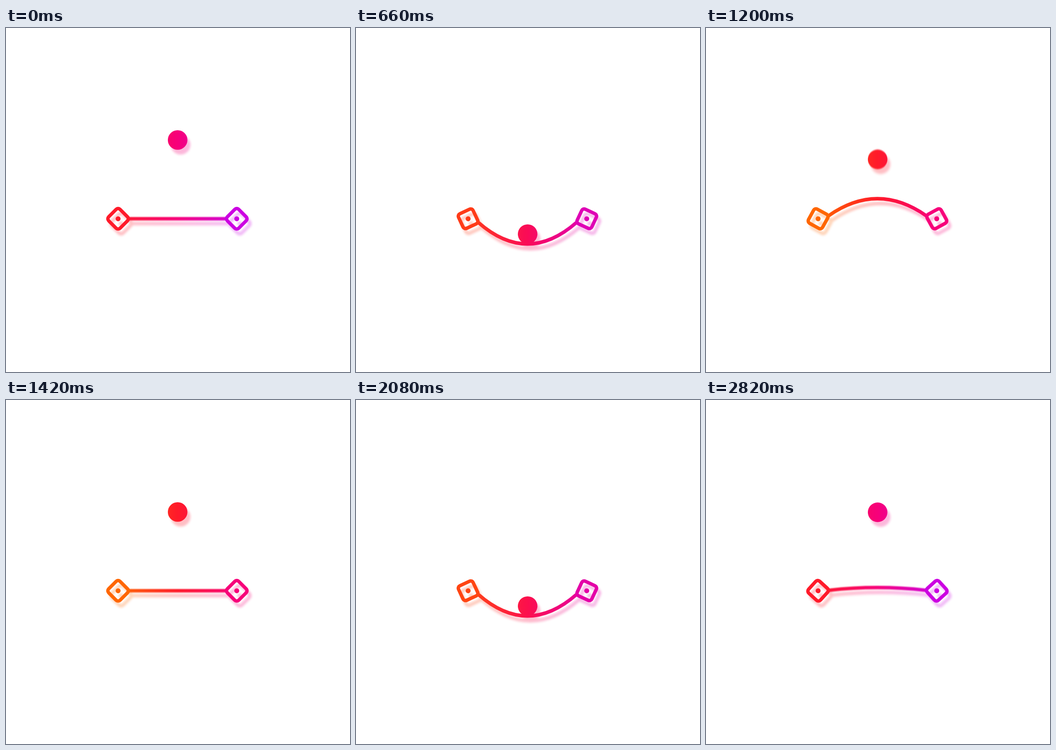
Recreate the animation shown at these times as an HTML page. Size 748x748 px, loop 2840 ms.

```html
<!DOCTYPE html>
<html lang="en">
<head>
<meta charset="utf-8">
<title>Bouncing ball on a string</title>
<style>
  html, body { margin: 0; width: 100%; height: 100%; overflow: hidden; background: #fff; }
  svg { display: block; width: 100vw; height: 100vh; }
</style>
</head>
<body>
<svg viewBox="0 0 748 748">
  <defs>
    <linearGradient id="paint" gradientUnits="userSpaceOnUse" x1="243" y1="0" x2="502" y2="0">
      <stop offset="0"/><stop offset=".5"/><stop offset="1"/>
    </linearGradient>
    <filter id="soft" filterUnits="userSpaceOnUse" x="0" y="0" width="748" height="748" color-interpolation-filters="sRGB">
      <feGaussianBlur stdDeviation="2.6"/>
    </filter>
    <filter id="ballBlur" filterUnits="userSpaceOnUse" x="0" y="0" width="748" height="748" color-interpolation-filters="sRGB">
      <feGaussianBlur stdDeviation="0 0.01"/>
    </filter>
    <filter id="lineBlur" filterUnits="userSpaceOnUse" x="0" y="0" width="748" height="748" color-interpolation-filters="sRGB">
      <feGaussianBlur stdDeviation="0 0.01"/>
    </filter>
    <g id="knot">
      <rect x="-17.5" y="-17.5" width="35" height="35" rx="6" transform="rotate(45)" fill="none" stroke="currentColor" stroke-width="7.5"/>
      <circle r="5.4" fill="currentColor"/>
    </g>
  </defs>
  <g filter="url(#soft)" opacity=".28"><use href="#scene" x="6.5" y="10.5"/></g>
  <g id="scene">
    <g filter="url(#lineBlur)"><path id="line" fill="none" stroke="url(#paint)" stroke-width="7.6"/></g>
    <use id="left" href="#knot"/>
    <use id="right" href="#knot"/>
    <g filter="url(#ballBlur)"><circle id="ball" cx="373.2" r="21.3" fill="url(#paint)"/></g>
  </g>
</svg>
<script>
const BOUNCE = 1420, LOOP = 2 * BOUNCE, STEP = 20;
const LEFT = 243.75, RIGHT = 501.75, REST = 414.8, ARM = 24;
const CONTACT = 393.5; // ball height when it touches the level string

// [time, value] keys over one bounce
const ballKeys = [[0, 243.5], [200, 255.5], [380, 325], [490, 394], [540, 421], [770, 459],
  [1000, 419], [1080, 354], [1280, 258], [1400, 244.1]];
const swingKeys = [[0, 0], [100, 26], [240, 0], [345, -18], [380, -16], [480, 0], [770, -1],
  [1000, -10], [1080, -38], [1150, -46], [1280, -34], [1400, -7]];

const palette = [[255, 102, 0], [255, 26, 42], [247, 0, 122], [204, 0, 226]];

// Smooth periodic curve that never overshoots its keys
function curve(keys) {
  const n = keys.length;
  const key = i => {
    const turn = Math.floor(i / n), k = keys[i - turn * n];
    return [k[0] + turn * BOUNCE, k[1]];
  };
  const slope = i => {
    const a = key(i), b = key(i + 1);
    return (b[1] - a[1]) / (b[0] - a[0]);
  };
  const tangent = i => {
    const p = slope(i - 1), q = slope(i);
    return p * q <= 0 ? 0 : 2 * p * q / (p + q);
  };
  return time => {
    const t = ((time % BOUNCE) + BOUNCE) % BOUNCE;
    let i = n - 1;
    while (keys[i][0] > t) i--;
    const a = key(i), b = key(i + 1), h = b[0] - a[0], u = (t - a[0]) / h, v = 1 - u;
    return v * v * (1 + 2 * u) * a[1] + u * u * (3 - 2 * u) * b[1]
      + h * u * v * (v * tangent(i) - u * tangent(i + 1));
  };
}

const ballY = curve(ballKeys);
const swing = curve(swingKeys);
const sag = t => Math.max(swing(t), ballY(t) - CONTACT);

const ease = u => { u = Math.min(1, Math.max(0, u)); return u * u * (3 - 2 * u); };
const mix = (a, b, u) => `rgb(${a.map((v, i) => Math.round(v + (b[i] - v) * u))})`;
const smear = (f, t) => `0 ${Math.max(0.01, Math.abs(f(t + 5) - f(t - 5)) / 3.46).toFixed(2)}`;

const $ = id => document.getElementById(id);
const stops = document.querySelectorAll("#paint stop");
const ball = $("ball"), line = $("line"), left = $("left"), right = $("right");
const blurOf = id => document.querySelector(`#${id} feGaussianBlur`);
const ballBlur = blurOf("ballBlur"), lineBlur = blurOf("lineBlur");

function draw(time) {
  const t = time % BOUNCE;
  const y = ballY(t), off = sag(t);

  const shift = ease((t - 500) / 350);
  const warm = time < BOUNCE ? shift : 1 - shift;
  const colors = [0, 1, 2].map(i => mix(palette[i + 1], palette[i], warm));
  stops.forEach((s, i) => s.setAttribute("stop-color", colors[i]));
  left.style.color = colors[0];
  right.style.color = colors[2];

  const angle = Math.atan2(off, 150), deg = angle * 180 / Math.PI;
  left.setAttribute("transform", `translate(${LEFT} ${REST}) rotate(${deg})`);
  right.setAttribute("transform", `translate(${RIGHT} ${REST}) rotate(${-deg})`);

  const dx = ARM * Math.cos(angle), endY = REST + ARM * Math.sin(angle);
  const pullY = 2 * (REST + off) - endY;
  line.setAttribute("d", `M${LEFT + dx} ${endY}Q${(LEFT + RIGHT) / 2} ${pullY} ${RIGHT - dx} ${endY}`);
  lineBlur.setAttribute("stdDeviation", smear(sag, t));

  ball.setAttribute("cy", y);
  ballBlur.setAttribute("stdDeviation", smear(ballY, t));
}

const start = performance.now();
function tick() {
  const elapsed = (performance.now() - start) % LOOP;
  draw(Math.floor(elapsed / STEP) * STEP);
  requestAnimationFrame(tick);
}
draw(0);
requestAnimationFrame(tick);
</script>
</body>
</html>
```
